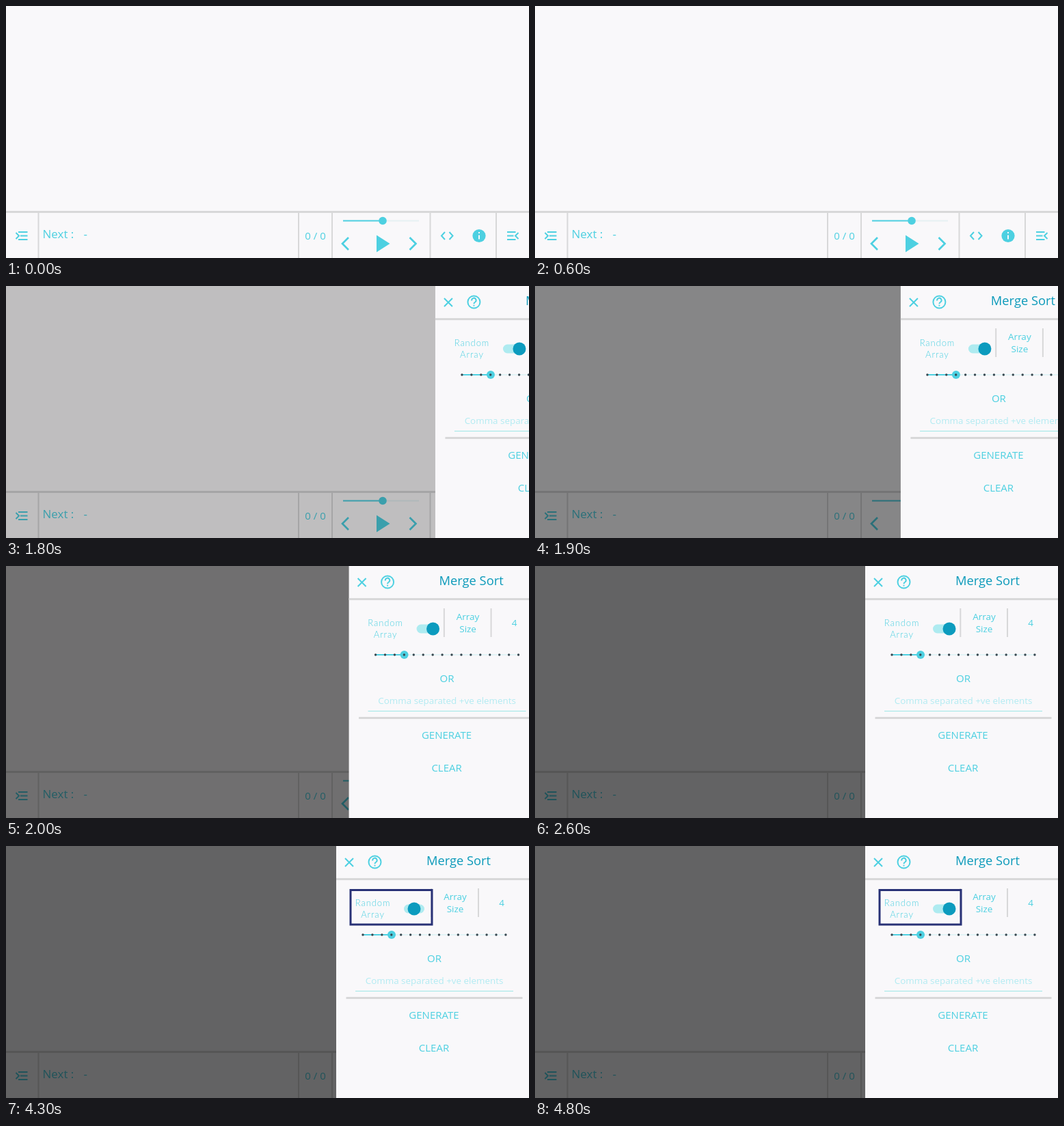
These frames come from a looping animation (765 px wide and 369 px high, 5 s). An HTML page:

```html
<!DOCTYPE html>
<html lang="en">
<head>
<meta charset="utf-8">
<style>
html, body { margin: 0; width: 100%; height: 100%; overflow: hidden; background: #f9f8fa; }
svg { display: block; font-family: "Open Sans", "Noto Sans", sans-serif; }
.line { fill: none; stroke: #4dd0e1; stroke-width: 2; }
.bold { stroke-width: 2.7; }
.rule { fill: none; stroke: #d8d8d9; stroke-width: 2; }
.thick { stroke-width: 3; }
.frame { fill: none; stroke: #283176; stroke-width: 3; }
.teal { fill: #4dd0e1; }
.mid { text-anchor: middle; }
.semi { font-weight: 500; }
.hand { font: 300 13px Lato, sans-serif; letter-spacing: .9px; }
</style>
</head>
<body>
<svg width="765" height="369" viewBox="0 0 765 369">
  <rect width="765" height="369" fill="#f9f8fa"/>
  <text id="heading" x="393.5" y="208" font-family="Liberation Serif, serif" font-size="18.1" fill="#1a14c0">Input Array</text>

  <!-- Player bar -->
  <path class="rule thick" d="M0 301.5H765"/>
  <path class="rule" d="M47.5 302V369M428 302V369M477 302V369M620.5 302V369M717 302V369"/>
  <path class="line" d="M18 331H31.500M21 336.500H31.500M18 342H31.500M14.500 332L19 336.500L14.500 341"/>
  <path class="line" d="M733 331H745.500M733 336.500H742.500M733 342H745.500M749.500 332L745 336.500L749.500 341"/>
  <g class="teal">
    <text class="semi" x="53.500" y="340" font-size="17">Next :</text>
    <text x="113.500" y="340" font-size="17">-</text>
    <text class="mid" x="452.500" y="342" font-size="15">0 / 0</text>
    <path d="M542 335.500L561.500 348L542 360.500Z"/>
    <circle cx="692" cy="336.500" r="9.600"/>
  </g>
  <path d="M551 314.500H604" stroke="#e6f1f4" stroke-width="2"/>
  <path class="line" d="M493 314.500H551M642 331L637 336.500L642 342M648.500 331L653.500 336.500L648.500 342"/>
  <circle class="teal" cx="551" cy="314.500" r="5.800"/>
  <path class="line bold" d="M501 339L492 348L501 357M590.500 339L599.500 348L590.500 357"/>
  <path d="M692 331V333M692 335.500V341.500" stroke="#f9f8fa" stroke-width="2"/>

  <rect id="shade" width="765" height="369"/>

  <!-- Settings drawer -->
  <g id="drawer">
    <rect x="483" width="282" height="369" fill="#f9f8fa"/>
    <path class="line" d="M496 18L508 30M508 18L496 30"/>
    <circle class="line" cx="539.500" cy="23.500" r="9"/>
    <path class="line" d="M536.300 21.500A3.200 3.200 0 1 1 541.300 23.500Q539.500 24.500 539.500 26.300M539.500 27.700V29.500" stroke-width="1.800"/>
    <text class="mid semi" x="662" y="28" font-size="18.300" fill="#0c9aba">Merge Sort</text>
    <path class="rule thick" d="M483 48.500H765M497.500 222.500H755.500"/>
    <path class="rule" d="M622.300 62V104M691 62V104"/>
    <g class="teal mid">
      <text id="mode" class="hand" x="536.500" y="88">Random</text>
      <text class="hand" x="536.500" y="105">Array</text>
      <g class="semi" font-size="13.500">
        <text x="657" y="79">Array</text>
        <text x="657" y="97">Size</text>
      </g>
      <text id="size" x="725" y="88" font-size="13.500">4</text>
      <text class="semi" x="626.500" y="170" font-size="15">OR</text>
      <text x="626" y="253" font-size="15">GENERATE</text>
      <text x="626" y="300.500" font-size="15">CLEAR</text>
    </g>
    <rect x="582" y="85.500" width="30" height="13" rx="6.500" fill="#aeebf0"/>
    <circle id="thumb" cx="606" cy="92" r="9.500" fill="#0c9bbe"/>
    <path d="M564 130H731" stroke="#cdeff3"/>
    <path class="line" d="M522 130H564"/>
    <circle class="teal" cx="564" cy="130" r="6"/>
    <g id="ticks" fill="#37474f"></g>
    <text id="hint" class="mid" x="626.500" y="202" font-size="13.400" fill="#b2ebf2">Comma separated +ve elements</text>
    <path id="underline" d="M511 212.500H742" stroke="#9ee6e6"/>
    <g id="error">
      <circle cx="732.500" cy="197" r="9.500" fill="#e4002f"/>
      <path d="M732.500 191.500V198.500M732.500 200.500V203" stroke="#fff" stroke-width="2.400"/>
    </g>
    <rect id="modeBox" class="frame" x="504" y="64.500" width="119" height="50.500"/>
    <rect id="inputBox" class="frame" x="488" y="177" width="264.500" height="38"/>
  </g>
</svg>
<script>
const $ = id => document.getElementById(id);
const set = (id, name, value) => $(id).setAttribute(name, value);
const fade = (id, on) => set(id, "opacity", on);

for (let i = 0; i < 16; i++) {
  $("ticks").innerHTML += `<circle cx="${522 + i * 13.93}" cy="130" r="1.7"/>`;
}

// Share of the opening done, n steps after it begins
const opened = (n, rest, decay) => n < 0 ? 0 : n >= 6 ? 1 : 1 - rest * decay ** n;

function draw(now) {
  const step = Math.floor(now % 5000 / 100);
  const custom = step >= 32 && step < 43;
  const applied = step >= 33 && step < 43;

  set("drawer", "transform", `translate(${282 * (1 - opened(step - 18, .514, .358))})`);
  fade("shade", .6 * opened(step - 18, .61, .38));

  $("mode").textContent = custom ? "Custom" : "Random";
  $("size").textContent = custom ? 0 : 4;
  set("thumb", "cx", step === 32 || step === 43 ? 597 : custom ? 587.5 : 606);
  set("hint", "x", custom ? 617 : 626.5);
  set("hint", "fill", custom ? "#c9f2ee" : "#b2ebf2");
  set("underline", "stroke", custom ? "#4fb3ac" : "#9ee6e6");
  fade("error", +custom);
  fade("heading", +applied);
  fade("modeBox", +(step >= 33));
  fade("inputBox", step === 38 ? .5 : +(step >= 34 && step < 38));
}

const start = performance.now();
function tick() {
  draw(performance.now() - start);
  requestAnimationFrame(tick);
}
tick();
</script>
</body>
</html>
```
